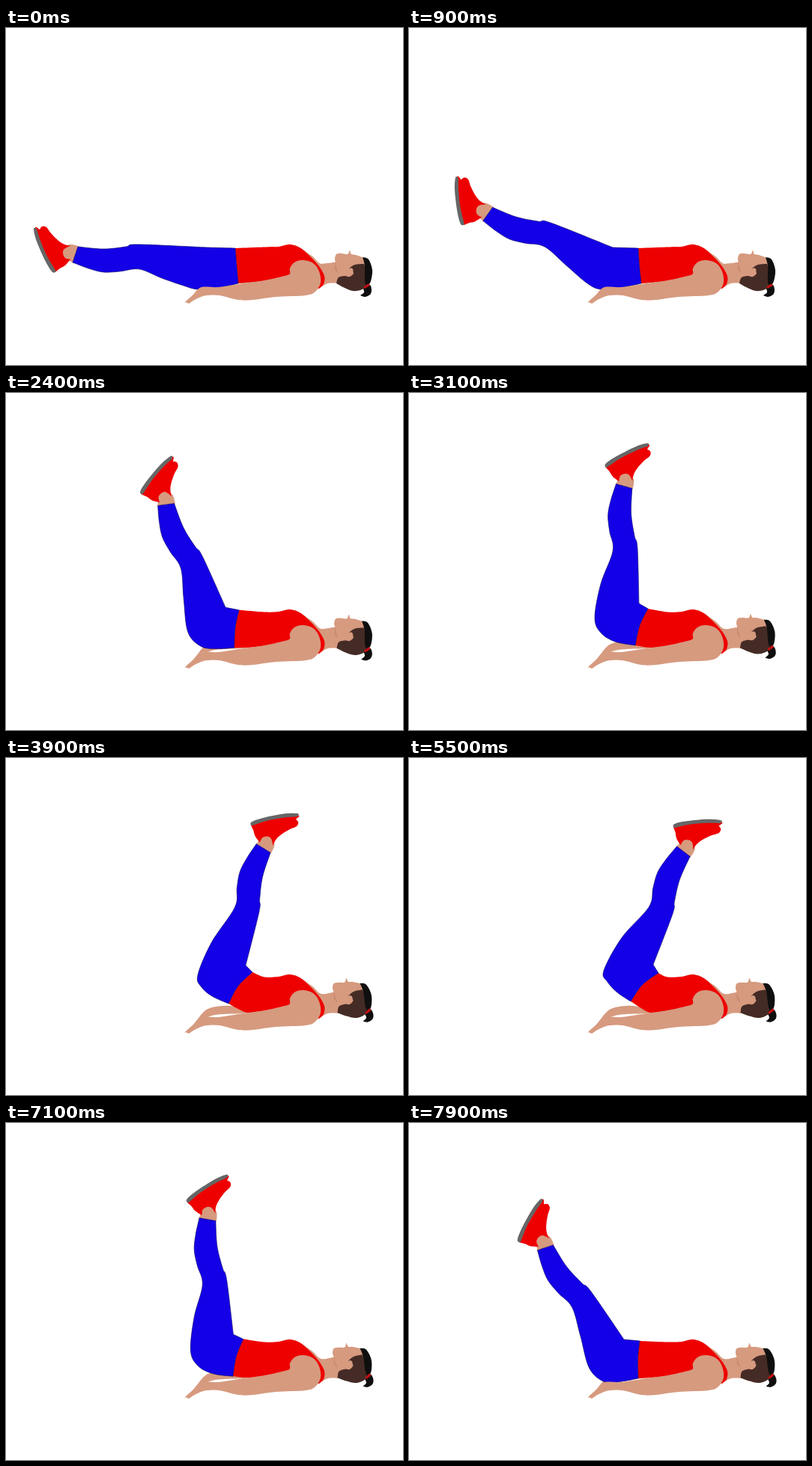
Write an HTML page with a canvas that moves like this. It is 530 px wide and 450 px high and loops after 8000 ms.

```html
<!DOCTYPE html>
<html>
<head>
<meta charset="utf-8">
<style>
html, body { margin: 0; width: 100%; height: 100%; overflow: hidden; background: #fff; }
canvas { display: block; }
</style>
</head>
<body>
<canvas id="stage" width="530" height="450"></canvas>
<script>
const ctx = document.getElementById('stage').getContext('2d');
const SKIN = '#d69a7f', RED = '#ee0000', BLUE = '#1400e6', BROWN = '#452b25', BLACK = '#100f0f', GREY = '#666';
const LOOP = 8000, STEP = 100, PEAK = 5000;

// Leg swing in degrees by time; the way down mirrors the way up.
const swing = [[0, 0], [900, 17], [1700, 40], [2100, 53], [2700, 75], [3100, 87], [3900, 103], [4500, 109], [5000, 111]];

// Swing, then x,y of: knee front, crease, waist top, waist bottom, seat, buttock, upper and mid back of thigh.
const poses = [
  [0, 176,289, 268,293, 306,294, 310,341, 285,347, 256,349, 237,344, 208,334],
  [17, 189,260, 272,293, 306,294, 310,341, 283,347, 256,349, 238,341, 211,318],
  [40, 226,238, 281,293, 306,294, 309,341, 280,347, 256,348, 240,333, 222,302],
  [53, 243,225, 287,289, 308,291, 306,341, 285,345, 262,346, 241,328, 229,285],
  [87, 305,207, 307,281, 319,288, 302,337, 275,332, 256,320, 248,300, 256,255],
  [103, 338,205, 320,277, 329,286, 297,328, 275,318, 261,306, 256,290, 274,247],
  [109, 352,208, 326,276, 333,287, 296,325, 278,313, 265,299, 260,284, 284,240]
];

// "x,y" pairs; a trailing ! makes a sharp corner.
const parse = text => text.split(' ').flatMap(s => {
  const p = s.replace('!', '').split(',').map(Number);
  return s.endsWith('!') ? [p, p] : [p];
});

const shinFront = parse('96,292! 130,295 160,292');
const shinBack = parse('178,322 152,325 130,326 110,321 89,313!');

const shapes = {
  farArm: parse('241,366 252,354 262,341 272,334 290,331 306,332 330,339! 316,341 290,342 275,344 262,350 248,365'),
  arm: parse('239,366 250,356 256,349 264,345.5 284,346 310,342 345,337 372,331 379,328 379,321 385,313 396,310 410,314 418,325 420,340 413,352 400,357 360,359 330,363 310,363 285,357 268,357 258,360 250,364 247,366 244,368 242,366'),
  neck: parse('385,289! 408,304 421,315 442,312! 455,325 446,341! 430,341 417,348! 400,330'),
  face: parse('421,315! 440,313! 439,308 441,302 447,301 456,302 459,297 461,302 467,303 478,307! 480,325 460,336 444,340! 438,330'),
  jaw: parse('440,312! 439,322 443,327 441,319'),
  hair: parse('458,321! 466,316 478,315! 483,330 480,345 473,350 463,351 452,347 441,341! 444,333 453,331! 459,332 464,327'),
  cap: parse('476,306! 484,309 489,323 487,338 482,346! 479,338 479,318'),
  tail: parse('480,343 486,343 488,350 486,356 479,359 473,357! 478,353 477,347'),
  band: parse('477,346! 484,341! 486,344! 479,348!'),
  ankle: parse('78,294! 85,289 97,291! 90,314! 82,309 75,303'),
  shoe: parse('39,267 45,269! 48,265 54,266 60,274 70,284 78,289 86,291! 78,295 76,301 79,307 86,309! 79,317 72,321 66,326! 58,312 48,292'),
  sole: parse('37,268 41,268! 46,284 55,305 67,325! 62,326 53,312 41,285')
};

function draw(pts, fill, line) {
  const n = pts.length, at = i => pts[(i + n) % n];
  ctx.beginPath();
  ctx.moveTo(...pts[0]);
  for (let i = 0; i < n; i++) {
    const a = at(i - 1), b = at(i), c = at(i + 1), d = at(i + 2);
    if (b[0] === c[0] && b[1] === c[1]) continue;
    ctx.bezierCurveTo(b[0] + (c[0] - a[0]) / 6, b[1] + (c[1] - a[1]) / 6,
      c[0] - (d[0] - b[0]) / 6, c[1] - (d[1] - b[1]) / 6, c[0], c[1]);
  }
  ctx.closePath();
  ctx.fillStyle = fill;
  ctx.fill();
  if (line) {
    ctx.strokeStyle = line;
    ctx.lineWidth = 0.6;
    ctx.stroke();
  }
}

// Smooth interpolation of column k over the first column.
function sample(rows, x, k) {
  const last = rows.length - 1;
  let i = 0;
  while (i < last - 1 && x > rows[i + 1][0]) i++;
  const slope = j => {
    const a = rows[Math.max(j - 1, 0)], b = rows[Math.min(j + 1, last)];
    return (b[k] - a[k]) / (b[0] - a[0]);
  };
  const p = rows[i], q = rows[i + 1], h = q[0] - p[0], s = (x - p[0]) / h;
  if (s > 1) return q[k] + slope(i + 1) * (x - q[0]);
  const r = 1 - s;
  return r * r * (1 + 2 * s) * p[k] + s * s * (3 - 2 * s) * q[k]
    + h * s * r * (r * slope(i) - s * slope(i + 1));
}

function turned(angle, from, to, paint) {
  ctx.save();
  ctx.translate(...to);
  ctx.rotate(angle);
  ctx.translate(-from[0], -from[1]);
  paint();
  ctx.restore();
}

function render(t) {
  const deg = sample(swing, PEAK - Math.abs(t - PEAK), 1);
  const angle = deg * Math.PI / 180, cos = Math.cos(angle), sin = Math.sin(angle);
  const [knee, crease, top, bottom, seat, butt, upper, mid] =
    Array.from({ length: 8 }, (_, i) => [sample(poses, deg, 2 * i + 1), sample(poses, deg, 2 * i + 2)]);
  const bend = 3 * deg / 109;
  const waist = [(top[0] + bottom[0]) / 2 - bend, (top[1] + bottom[1]) / 2 - bend];
  const restKnee = [176, 289];
  const place = ([x, y]) => {
    x -= restKnee[0];
    y -= restKnee[1];
    return [knee[0] + x * cos - y * sin, knee[1] + x * sin + y * cos];
  };

  ctx.fillStyle = '#fff';
  ctx.fillRect(0, 0, 530, 450);
  draw(shapes.farArm, SKIN);
  draw(shapes.neck, SKIN);

  const tilt = -8 * Math.PI / 180 * Math.min(1, Math.max(0, (t - 1800) / 2000));
  turned(tilt, [436, 329], [436, 329], () => {
    draw(shapes.tail, BLACK);
    draw(shapes.face, SKIN);
    draw(shapes.jaw, '#c98c72');
    draw(shapes.hair, BROWN);
    draw(shapes.cap, BLACK);
    draw(shapes.band, '#c01010');
    ctx.fillStyle = SKIN;
    ctx.beginPath();
    ctx.ellipse(459, 326, 4, 6, 0.5, 0, 7);
    ctx.fill();
  });

  draw([top, top, ...parse('345,292.5 364,292 378,289 392,293 404,303 417,317 425,331 424,342 418,348! 380,345 340,340 321,340'),
    bottom, bottom, waist], RED);

  turned(angle, restKnee, knee, () => {
    draw(shapes.ankle, SKIN);
    draw(shapes.shoe, RED);
    draw(shapes.sole, GREY);
  });

  draw([...shinFront.map(place), knee, crease, crease, top, top, waist, bottom, bottom,
    seat, butt, upper, mid, ...shinBack.map(place)], BLUE, '#0a0060');
  draw(shapes.arm, SKIN);
}

const start = performance.now();
function tick() {
  const t = (performance.now() - start) % LOOP;
  render(Math.floor(t / STEP) * STEP);
  requestAnimationFrame(tick);
}
tick();
</script>
</body>
</html>
```
